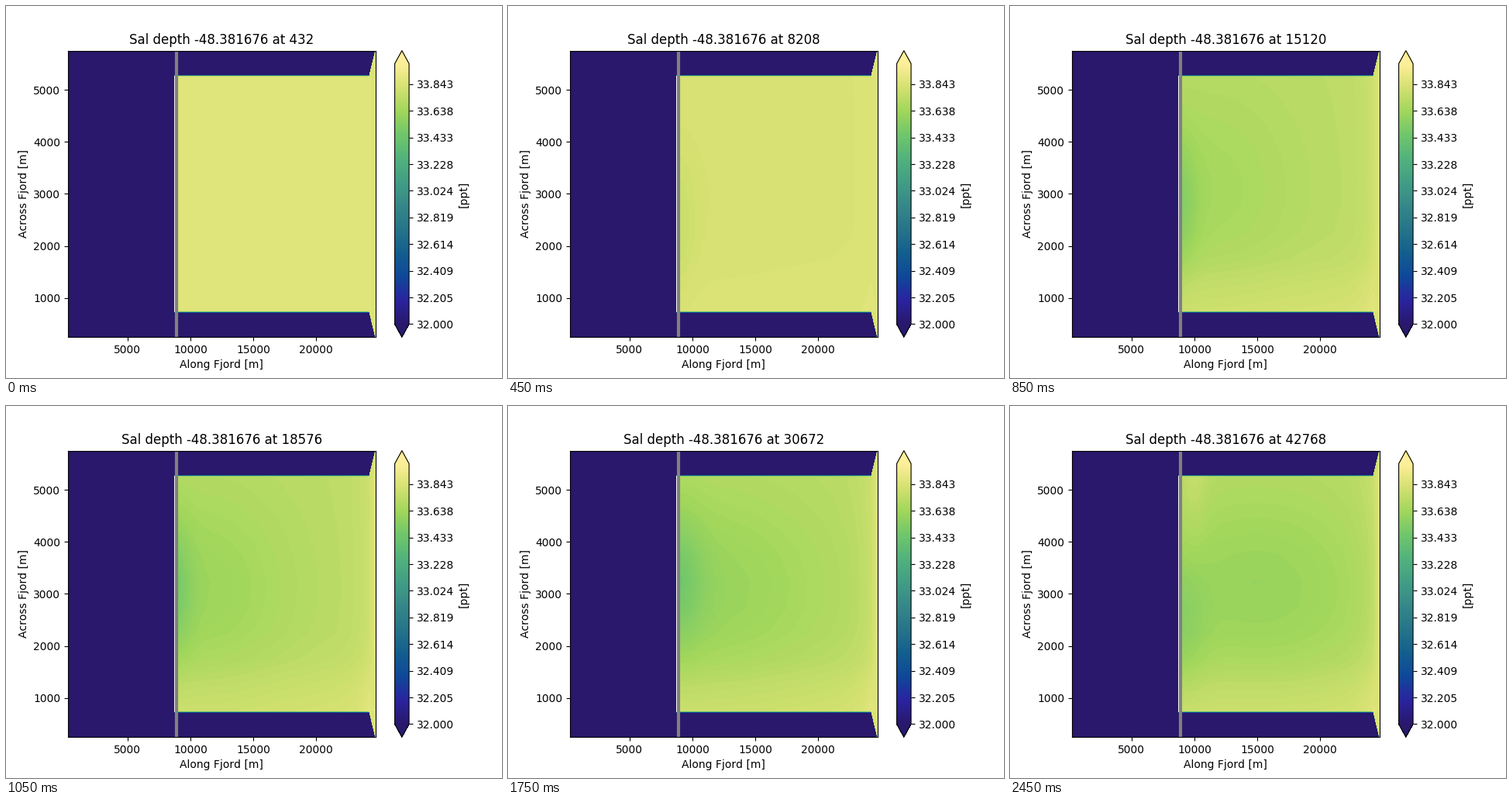
Animation, 640 px wide and 480 px high, one loop 2.5 s. Source, as a matplotlib script:

```python
import numpy as np
import matplotlib.pyplot as plt
from matplotlib.animation import FuncAnimation
from matplotlib.colors import LinearSegmentedColormap
from matplotlib.patches import Rectangle

plt.rcParams["text.kerning_factor"] = 6

FRAMES = 50
STEP = 864
LEVELS = np.linspace(32, 34, 128)

HALINE = LinearSegmentedColormap.from_list("haline", [
    "#29186b", "#2a23a0", "#0f4799", "#125f8e", "#267489", "#358888",
    "#419d85", "#51b27c", "#6fc66b", "#a0d65b", "#d4e170", "#fdee99",
])

# Cell centres in metres; the first and last rows are land
x = np.arange(8750, 24751, 500)
y = np.arange(250, 5751, 500)
X, Y = np.meshgrid(x / 1000, np.clip(y, 750, 5250) / 1000)


def ramp(n, start, end):
    """Smooth rise from 0 to 1 between two times."""
    t = np.clip((n - start) / (end - start), 0, 1)
    return t * t * (3 - 2 * t)


def bell(cx, cy, w, h):
    return np.exp(-((X - cx) / w) ** 2 - ((Y - cy) / h) ** 2)


def salinity(n):
    fresh = ramp(n, 7, 15)
    spread = ramp(n, 21, 32)
    late = ramp(n, 35, 49)

    # The interior freshens, the open and southern edges stay salty
    edges = 0.06 * np.exp(X - 24.25) + 0.085 * np.exp(-((Y - 0.75) / 0.8) ** 2)
    s = 33.86 + fresh * (edges - 0.125)

    # Meltwater jet at the wall, swaying north and south
    jet = 0.16 * ramp(n, 0, 21) - 0.05 * late
    jet_y = 2.95 - 0.55 * np.cos(2 * np.pi * (n - 9) / 40)
    s -= jet * bell(8.75, jet_y, 1.4 + 0.7 * spread, 1.25)

    # Broad basin that widens and drifts away from the wall
    s -= 0.13 * ramp(n, 5, 26) * bell(11 + 4 * late, 3.1, 7 + 3 * spread, 2.0)

    # Salty corner to the north-west
    s += 0.06 * late * bell(10, 5.25, 1, 1.3)

    s[[0, -1]] = 0
    s[:, -1] = 33.855
    return s


def contours(n):
    return ax.contourf(x, y, salinity(n), levels=LEVELS, cmap=HALINE,
                       extend="both")


fig, ax = plt.subplots(figsize=(6.4, 4.8), dpi=100)
ax.set_facecolor(HALINE(0))
ax.set_xlim(250, 24750)
ax.set_ylim(250, 5750)
ax.set_xlabel("Along Fjord [m]")
ax.set_ylabel("Across Fjord [m]")

field = contours(0)
fig.colorbar(field, ax=ax, label="[ppt]", format="%.3f")
ax.add_patch(Rectangle((8700, 735), 180, 4535, color="white", lw=0,
                       zorder=1.5))
ax.axvline(8880, color="grey", lw=3, zorder=2)


def draw(n):
    global field
    field.remove()
    field = contours(n)
    ax.set_title(f"Sal depth -48.381676 at {432 + STEP * n}")


anim = FuncAnimation(fig, draw, frames=FRAMES, interval=50, repeat=True)
plt.show()
```
